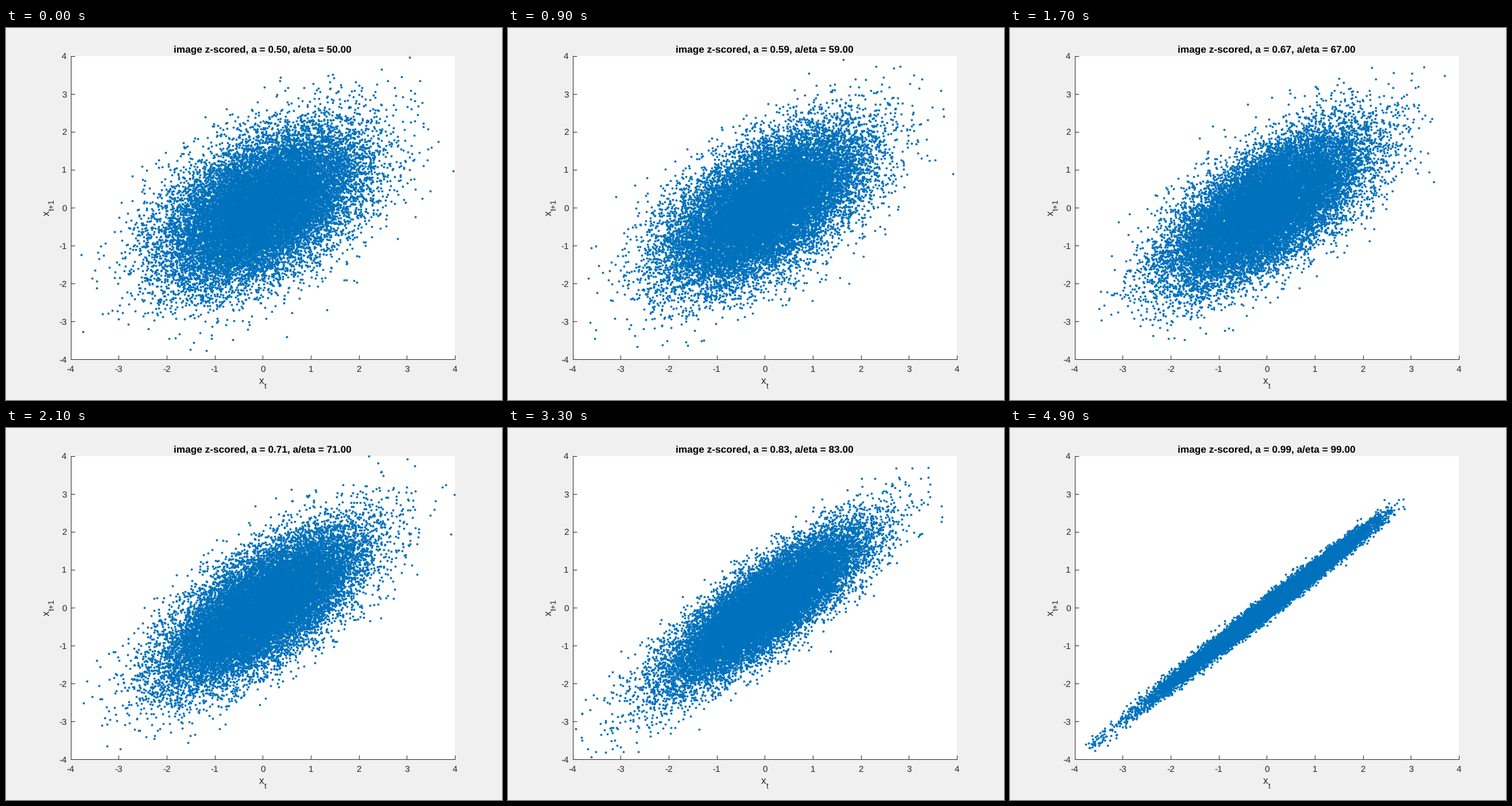
Recreate the animation shown at these times as a matplotlib script. Size 864 by 648 pixels, loop 5000 ms.

```python
import numpy as np
import matplotlib.pyplot as plt
from matplotlib.animation import FuncAnimation

W, H = 864, 648
FRAMES, INTERVAL = 50, 100
SAMPLES = 20000
ETA = 0.01
LIMIT = 4
BLUE, INK, PAPER = "#0072BD", "#262626", "#F0F0F0"
LEFT, RIGHT, TOP, BOTTOM = 112.5, 782, 48.7, 576.9

plt.rcParams["font.family"] = "Liberation Sans"
plt.rcParams["text.hinting"] = "none"


def make_series():
    """One z-scored autoregressive series per column, a rising by ETA."""
    rng = np.random.default_rng(7)
    a = 0.5 + ETA * np.arange(FRAMES)
    series = -rng.standard_normal((SAMPLES + 1, FRAMES))
    series[1:] *= np.sqrt(1 - a**2)
    for t in range(SAMPLES):
        series[t + 1] += a * series[t]
    return a, (series - series.mean(axis=0)) / series.std(axis=0)


coefficients, series = make_series()

fig = plt.figure(figsize=(W / 72, H / 72), dpi=72, facecolor=PAPER)
ax = fig.add_axes([LEFT / W, 1 - BOTTOM / H, (RIGHT - LEFT) / W, (BOTTOM - TOP) / H])
ax.set(xlim=(-LIMIT, LIMIT), ylim=(-LIMIT, LIMIT))
ax.spines[["top", "right"]].set_visible(False)
ax.spines[["left", "bottom"]].set(color=INK, linewidth=1)
ticks = range(-LIMIT, LIMIT + 1)
ax.set_xticks(ticks)
ax.set_yticks(ticks)
ax.tick_params(direction="in", length=6.7, width=1, color=INK,
               labelbottom=False, labelleft=False)


def label(x, y, text, size, ha="left", **style):
    """Text with its baseline at pixel (x, y), measured from the top left."""
    style = {"color": INK, "va": "baseline", **style}
    return fig.text(x / W, 1 - y / H, text, fontsize=size, ha=ha, **style)


for value in ticks:
    share = (value + LIMIT) / (2 * LIMIT)
    label(LEFT + share * (RIGHT - LEFT), 598.7, str(value), 15.4, ha="center")
    label(105.5, BOTTOM - share * (BOTTOM - TOP) + 5.7, str(value), 15.4, ha="right")

label(440.5, 620.5, "x", 17.5)
label(449.6, 627.5, "t", 14)
vertical = dict(rotation=90, rotation_mode="anchor")
label(76, 327.2, "x", 17.5, **vertical)
label(84, 318.4, "t+1", 14, **vertical)

title = label(447.3, 42, "", 17.3, ha="center", color="black", weight="bold")
dots, = ax.plot([], [], "o", color=BLUE, markersize=3.9, markeredgewidth=0,
                clip_on=False)


def update(frame):
    a = coefficients[frame]
    x, y = series[:-1, frame], series[1:, frame]
    inside = (abs(x) <= LIMIT) & (abs(y) <= LIMIT)
    dots.set_data(x[inside], y[inside])
    title.set_text(f"image z-scored, a = {a:.2f}, a/eta = {a / ETA:.2f}")
    return dots, title


animation = FuncAnimation(fig, update, frames=FRAMES, interval=INTERVAL,
                          repeat=True, repeat_delay=0)
plt.show()
```
